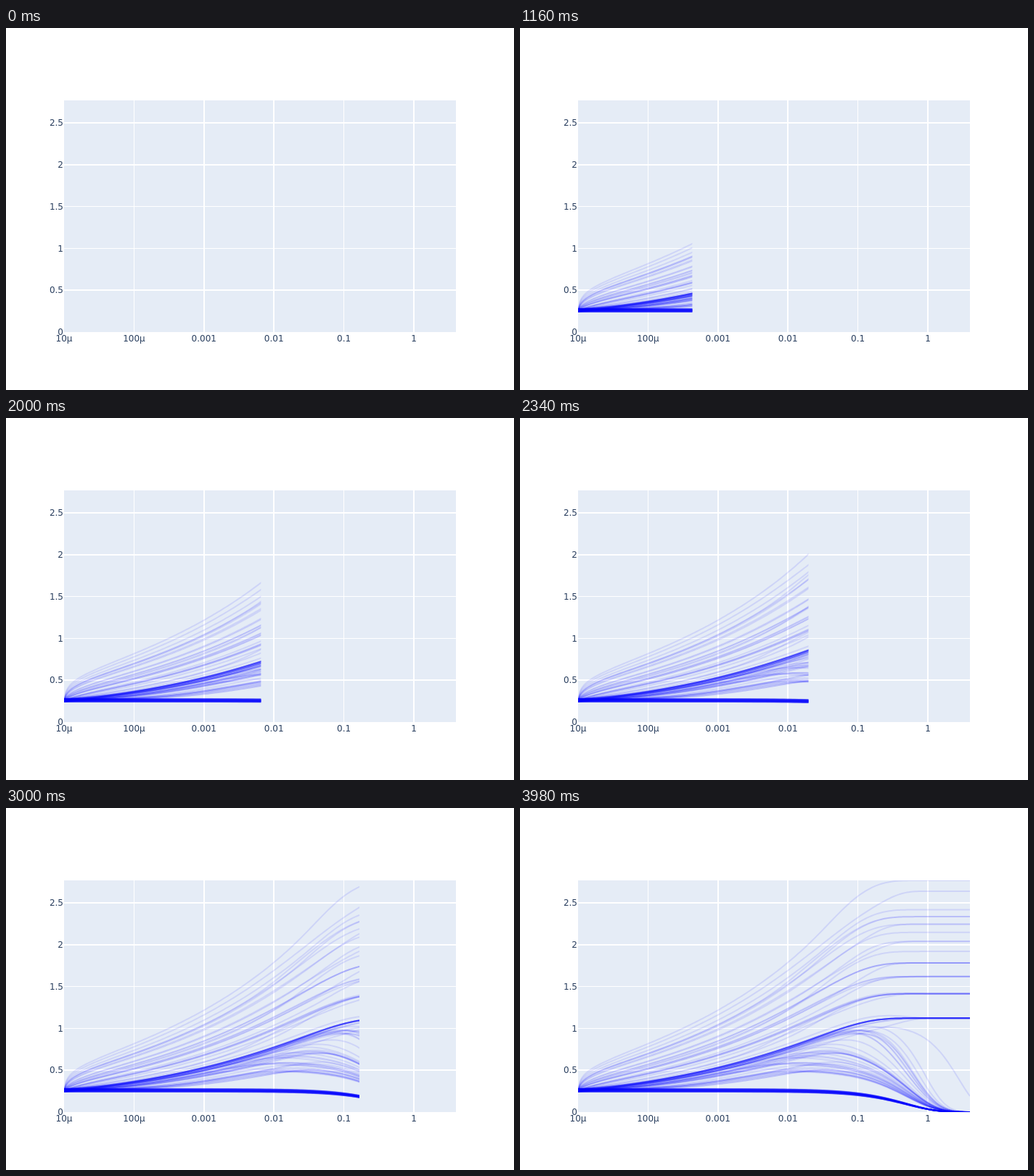
Write an HTML page that moves like this. It is 700 px wide and 500 px high and loops after 4 s.

```html
<!DOCTYPE html>
<html lang="en">
<head>
<meta charset="utf-8">
<title>Growth curves</title>
<style>
  html, body { margin: 0; width: 100%; height: 100%; overflow: hidden; background: #fff; }
  svg { display: block; }
  text { font: 12px "DejaVu Sans", sans-serif; fill: #2a3f5f; }
  .grid { fill: #fff; }
  .curve { fill: none; stroke: #00f; stroke-width: 2; stroke-opacity: .1; }
</style>
</head>
<body>
<svg width="700" height="500" viewBox="0 0 700 500">
  <defs><clipPath id="reveal"><rect id="window" x="80" y="100" width="0" height="320"/></clipPath></defs>
  <rect x="80" y="100" width="540" height="320" fill="#e5ecf6"/>
  <g id="axes"></g>
  <g id="curves" clip-path="url(#reveal)"></g>
</svg>
<script>
const LEFT = 80, WIDTH = 540, TOP = 100, BOTTOM = 420;
const UNIT = 115.6, DECADE = 96.4;
const LOOP = 4000, STEP = 20, LAST = LOOP / STEP - 1;
const DECAY = 2, POWER = 6;

const axes = document.getElementById('axes');
const curves = document.getElementById('curves');
const reveal = document.getElementById('window');

function add(parent, tag, attrs, text = '') {
  const node = document.createElementNS('http://www.w3.org/2000/svg', tag);
  for (const key in attrs) node.setAttribute(key, attrs[key]);
  node.textContent = text;
  parent.append(node);
}

const toY = value => BOTTOM - value * UNIT;
const timeAt = x => 10 ** ((x - LEFT) / DECADE - 5);
const mix = (a, b, k) => a + (b - a) * k;

let seed = 11;
function random(min, max) {
  seed = (seed * 16807) % 2147483647;
  return mix(min, max, seed / 2147483647);
}
const randomLog = (min, max) => Math.exp(random(Math.log(min), Math.log(max)));

function repeat(count, make) {
  for (let i = 0; i < count; i++) make(i);
}

// Whole pixels touched by a one pixel wide line.
function snap(center) {
  const from = Math.floor(center - 0.35);
  return [from, Math.ceil(center + 0.35) - from];
}

function drawAxes() {
  ['10µ', '100µ', '0.001', '0.01', '0.1', '1'].forEach((label, i) => {
    const center = LEFT + i * DECADE;
    const [x, width] = snap(center);
    if (i) add(axes, 'rect', { class: 'grid', x, width, y: TOP, height: BOTTOM - TOP });
    add(axes, 'text', { x: center, y: 433, 'text-anchor': 'middle' }, label);
  });
  for (let value = 0; value <= 2.5; value += 0.5) {
    const center = toY(value);
    const [y, height] = snap(center);
    if (value) add(axes, 'rect', { class: 'grid', x: LEFT, width: WIDTH, y, height });
    add(axes, 'text', { x: 79, y: center + 4.2, 'text-anchor': 'end' }, String(value));
  }
}

// A norm r follows d(r^6)/dt = 12 (2 pull^2 - r^6), where the pull
// changes from its first to its final strength around the time `turn`.
function grow(first, final, turn) {
  let energy = random(0.242, 0.279) ** POWER;
  let time = timeAt(LEFT);
  let d = `M${LEFT},${toY(energy ** (1 / POWER)).toFixed(2)}`;
  repeat(LAST, i => {
    const x = LEFT + WIDTH * (i + 1) / LAST;
    const next = timeAt(x);
    const keep = Math.exp(-DECAY * POWER * (next - time));
    const settled = 1 - Math.exp(-((((time + next) / 2) / turn) ** 1.5));
    const pull = mix(first, final, settled);
    energy = energy * keep + 2 * pull * pull * (1 - keep);
    time = next;
    d += `L${x.toFixed(2)},${toY(energy ** (1 / POWER)).toFixed(2)}`;
  });
  add(curves, 'path', { class: 'curve', d });
}

function cluster(size) {
  const spread = 0.3 / Math.sqrt(size);
  grow(size * (0.86 + random(-spread, spread)), size, randomLog(0.003, 0.4));
}

drawAxes();
[15, 13, 10, 9, 9, 8, 8, 7, 6, 6, 5].forEach(cluster);
repeat(4, () => cluster(4));
repeat(4, () => cluster(3));
repeat(7, () => cluster(2));
repeat(9, () => cluster(1));
repeat(8, () => grow(random(0.96, 1), 1, 0.02));
repeat(10, () => grow(random(0.75, 1.05), 0, randomLog(0.1, 0.4)));
repeat(28, () => grow(random(0.2, 0.8), 0, randomLog(0.004, 0.07)));
grow(0.8, 0, 1.3);
repeat(55, () => grow(0, 0, 1));

function render(now) {
  const step = Math.floor((now % LOOP) / STEP);
  reveal.setAttribute('width', WIDTH * step / LAST);
  requestAnimationFrame(render);
}
render(0);
</script>
</body>
</html>
```
